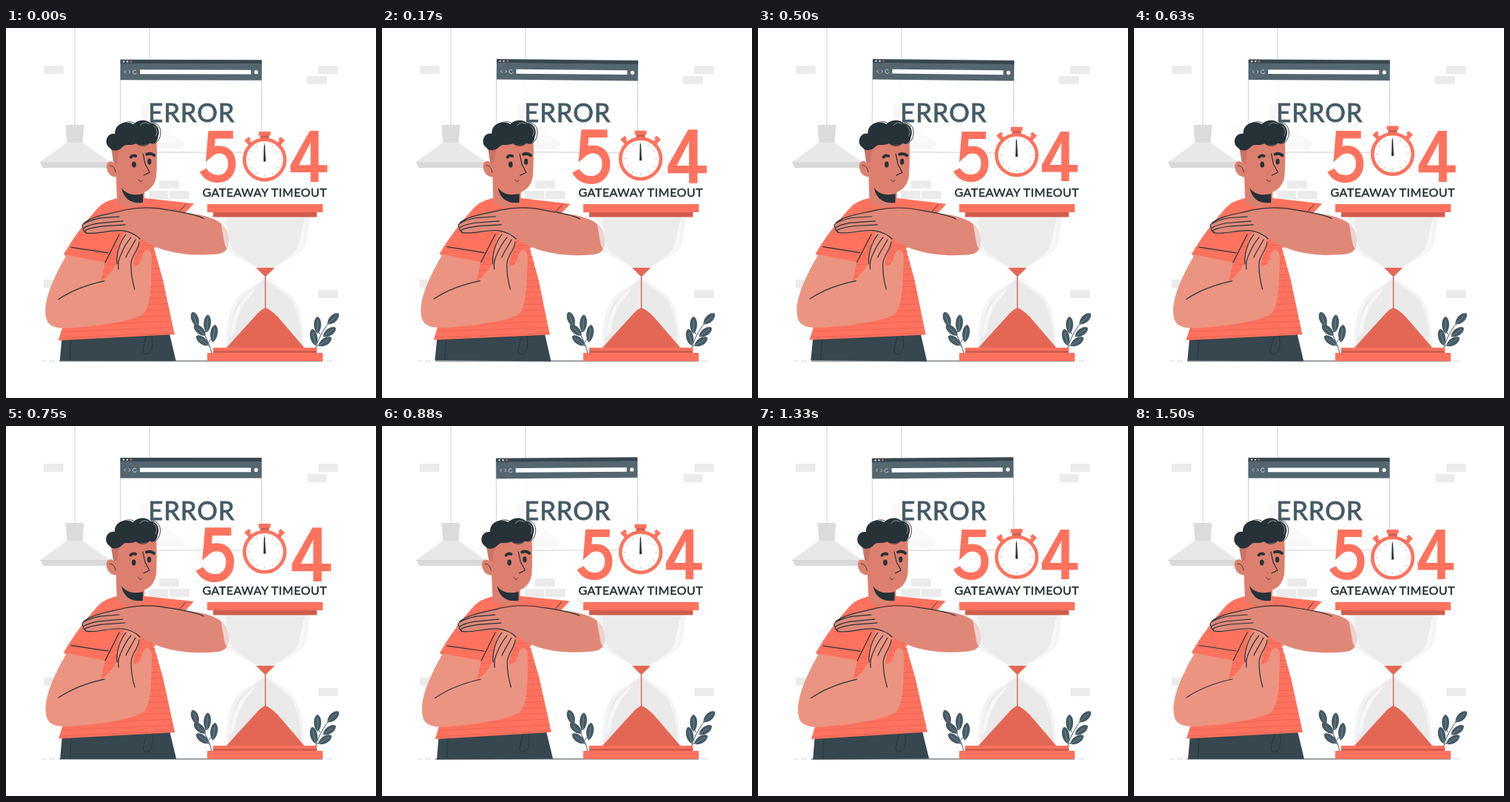
These frames come from a looping animation (500 px wide and 500 px high, 1540 ms). An HTML page:

```html
<!DOCTYPE html>
<html lang="en">
<head>
<meta charset="utf-8">
<title>Gateway timeout</title>
<style>
html, body { margin: 0; width: 100%; height: 100%; overflow: hidden; background: #fff; }
svg { display: block; width: 100%; height: 100%; }
text { font-family: Lato, "Open Sans", sans-serif; font-weight: 400; text-anchor: middle; }
.ink { fill: none; stroke: #263238; stroke-width: 1.2; stroke-linecap: round; stroke-linejoin: round; }
.fine { stroke-width: .9; }
.brow { stroke-width: 4; }
.dark { fill: #263238; }
.coral { fill: #ff725e; }
.deep { fill: #d05d4d; }
.face { fill: #dd7f6e; }
.white { fill: #fff; }
</style>
</head>
<body>
<svg viewBox="0 0 500 500">
  <defs>
    <clipPath id="torso"><path d="M118 292L200 292L212 340L228 414L71 422.500L84 380Z"/></clipPath>
    <g id="lamp">
      <path d="M0 -140V131" stroke="#cfcfcf"/>
      <path d="M-12.500 131H12.500L10.500 156H-10.500Z" fill="#dcdcdc"/>
      <path d="M-10.500 155H10.500L47 181H-47Z" fill="#e8e8e8"/>
      <path d="M-47 181H47L44 189H-43Z" fill="#d9d9d9"/>
    </g>
  </defs>

  <g id="bricks" fill="#ebebeb"></g>
  <use href="#lamp" x="93"/>
  <use href="#lamp" x="194" y="-26"/>

  <g id="browser">
    <rect x="154.500" y="43" width="191" height="125" fill="#fff" fill-opacity=".8" stroke="#c4c4c4" stroke-width=".8"/>
    <rect x="154.500" y="43" width="191" height="5.500" fill="#37474f"/>
    <rect x="154.500" y="48" width="191" height="22.500" fill="#546670"/>
    <circle cx="159" cy="45.600" r="1.100" class="white"/>
    <circle cx="164" cy="45.600" r="1.100" class="white"/>
    <circle cx="169" cy="45.600" r="1.100" class="coral"/>
    <path d="M162 57.500L160 59.500L162 61.500M166 57.500L168 59.500L166 61.500M176 58A2.600 2.600 0 1 0 176.500 60.500" fill="none" stroke="#fff" stroke-width=".7"/>
    <rect x="181" y="56.500" width="150" height="5.800" class="white"/>
    <circle cx="338" cy="59.500" r="2.600" class="white"/>
  </g>

  <text x="250.800" y="126.500" font-size="34.500" letter-spacing="1" fill="#455a64" stroke="#455a64" stroke-width=".9">ERROR</text>
  <path d="M48 450H54M58 450H66M433 450H441" stroke="#263238" stroke-width=".5" opacity=".4"/>
  <path d="M72 450H428" stroke="#263238" stroke-width=".9"/>

  <g id="man">
    <path d="M76 416L73 450H230L220 408Z" fill="#37474f"/>
    <path class="ink fine" d="M88 422L86.500 448M190 416C187 427 184 435 186 439C189 442 195 440 197 434C199 427 198 420 197 415"/>
    <path class="coral" d="M150 230C135 234 129 237 120 248C104 266 90 285 78 306L92 318L84 380L71 422.500L228 414L212 340L200 298L240 252L254 237L188 230Z"/>
    <g id="stripes" clip-path="url(#torso)" stroke="#e4624f" stroke-width=".8"></g>
    <path class="ink fine" d="M243 238L235 247"/>

    <g id="head">
      <path class="face" d="M148 185L150 236C160 246 180 244 187 236L187 210Z"/>
      <path class="dark" d="M156 216C164 227 176 226 185 224V236C169 238 159 231 156 216Z"/>
      <path class="face" d="M147 158L203 148C204 167 204 185 203 200C201 215 190 224 177 223C164 221 155 213 152 200C148 203 140 201 137 193C133 183 139 177 146 182Z"/>
      <path d="M142 163L156 157C152 166 151 175 150 183L145 181Z" fill="#c97466"/>
      <path class="ink fine" d="M140 186C145 186 147 190 148 195"/>
      <path class="dark" d="M140 162C131 156 136 141 147 143C146 130 161 124 172 130C179 122 192 124 195 129C204 128 209 139 205 147C205 154 199 158 194 155C190 159 181 160 176 156C168 160 162 156 158 160C152 167 143 167 140 162Z"/>
      <path class="ink fine" d="M149 141C151 127 168 124 174 129M195 128C208 127 211 140 207 149C204 157 197 157 194 155M176 156C183 162 192 159 194 155"/>
      <path d="M181 132C184 127 190 127 193 130M199 132C204 135 205 141 202 146" fill="none" stroke="#fff" stroke-width=".5"/>
      <path class="ink brow" d="M168.500 174.500C170 172.500 173 172 175 173M190 170.500C194 169 197 169.500 200 172"/>
      <ellipse class="dark" cx="172.800" cy="184.500" rx="2.800" ry="4.100"/>
      <ellipse class="dark" cx="193.600" cy="180.500" rx="2.600" ry="4.100"/>
      <path class="ink" d="M185 170L188 184L194 195L186 199"/>
      <path class="ink fine" d="M179 205C180 208 183 208 184 206"/>
    </g>

    <path d="M83 305C65 336 48 372 55 394C59 408 80 407 100 404.500C135 402 165 396 182 389C197 383 196 345 197 310C197 297 186 297 184 309C183 316 178 322 172 322C172 308 179 300 181 289L178 278L160 276C153 288 150 300 150 316C146 326 139 335 128 343L134 316Z" fill="#eb9481"/>
    <path class="coral" d="M120 248L78 306L134 317L153 278L148 246Z"/>
    <path class="ink" d="M88 296.500L138 304M134 317L153 279"/>
    <path class="ink" d="M133 342C110 347 87 356 71 367M150 319C149 304 154 289 162 279M152 326C151 318 152 313 155 307C159 297 164 289 169 283M162 310C166 301 171 294 175 286M180 289C179 301 170 306 169 319C169 333 171 343 174 353"/>

    <path d="M301 284C303 298 296 305 282 305.500C242 309 204 302 180 283C172 275 160 275 149 275C132 276 118 280 106 277C101 274 102 267 110 261C128 251 145 250 160 246C190 241 225 247 260 252C286 257 300 266 301 284Z" fill="#e08877"/>
    <path class="ink" d="M105 264C118 253 143 251 160 246C185 241 202 242 220 246C240 249 257 252 267 257M104 270C99 265 113 260 127 257L153 255M108 276C98 271 110 267 124 264L158 261M108 277C101 273 117 270 130 268L161 266M108 277C122 280 142 272 158 274C170 276 176 280 181 285"/>
  </g>

  <g id="digits">
    <path d="M308 145H280L278 169C282 165.500 286 164.500 290 164.500C301 164.500 306.500 173 306.500 183C306.500 195 299 203 288 203C279 203 272.500 199 268.500 191.500" fill="none" stroke="#ff725e" stroke-width="10"/>
    <path class="coral" fill-rule="evenodd" d="M409 140H420.500V185H432V194.500H420.500V207H410V194.500H383.500V185ZM410 155L394.500 185H410Z"/>
  </g>

  <g id="watch">
    <g class="coral">
      <path d="M322 152L328 147L331 150L329.500 152L333 156L329 160L325.500 155.500Z"/>
      <path d="M377 152L371 147L368 150L369.500 152L366 156L370 160L373.500 155.500Z"/>
    </g>
    <rect class="deep" x="343.500" y="145" width="12" height="6"/>
    <rect class="coral" x="341.500" y="140" width="16" height="5.500"/>
    <circle cx="349.500" cy="178" r="27.300" fill="#fff" stroke="#ff725e" stroke-width="4.600"/>
    <g id="ticks" stroke="#d5aaa3" stroke-width=".8"></g>
    <path class="dark" d="M348 180L348.600 159L349.300 157L350 159L351 180Z"/>
    <circle class="dark" cx="349.500" cy="179" r="1.700"/>
  </g>

  <text x="349.700" y="228" font-size="16" letter-spacing=".5" fill="#263238" stroke="#263238" stroke-width=".5">GATEAWAY TIMEOUT</text>

  <g id="plants" fill="#455a64" stroke="#455a64"></g>

  <g id="hourglass">
    <path d="M289 255H411L405 290C403 300 397 304 388 309L353 330V339L382 359C394 369 402 386 403 433H297C298 386 306 369 318 359L348 339V330L312 309C303 304 297 300 295 290Z" fill="#f0f0f0" fill-opacity=".72"/>
    <path d="M297 255H404L398 288C396 299 391 303 383 308L352 330V336H349V330L317 308C309 303 304 299 302 288Z" fill="#eaeaea" fill-opacity=".85"/>
    <path d="M350 339L321 362C309 372 302 396 301 433H400C399 396 391 372 379 362Z" fill="#e9e9e9" fill-opacity=".85"/>
    <path d="M337 351C323 361 317 370 311 382C306 393 304 405 303 419L309 410C311 394 315 383 322 373C328 363 334 358 337 351ZM402 263L396 290C394 298 391 302 386 306L393 303C399 299 401 295 402 289L405 263Z" fill="#fafafa" fill-opacity=".85"/>
    <path d="M338 324H363L352 335H349Z" fill="#e46755"/>
    <path d="M350.500 334V380" stroke="#e46755" stroke-width="1.500"/>
    <path d="M297 433L337 389C342 383 346 380 350.500 378C356 380 362 385 367 390L404 433Z" fill="#e46755"/>
    <rect class="coral" x="272" y="238" width="156" height="11"/>
    <rect class="deep" x="280" y="249" width="140" height="6.500"/>
    <rect class="coral" x="280" y="432" width="140" height="5"/>
    <rect class="deep" x="280" y="436" width="140" height="3"/>
    <rect class="coral" x="272" y="439" width="156" height="11"/>
  </g>
</svg>
<script>
const $ = id => document.getElementById(id);
const fill = (id, html) => { $(id).innerHTML = html; };

fill('bricks', [[51, 51], [422, 51], [407, 65], [207, 206], [221, 220], [193, 220], [51, 340], [422, 354]]
  .map(([x, y]) => `<rect x="${x}" y="${y}" width="26.500" height="11"/>`).join(''));

fill('stripes', Array.from({ length: 16 }, (_, i) => {
  const y = 294 + i * 8;
  return `<path d="M70 ${y + 5}L230 ${y - 2}"/>`;
}).join(''));

fill('ticks', Array.from({ length: 12 }, (_, i) =>
  `<path d="M349.500 155.500v3" transform="rotate(${i * 30} 349.500 178)"/>`).join(''));

// Leaves: centre x, centre y, half length, tilt
const leaf = ([x, y, r, a]) => `<g transform="translate(${x} ${y}) rotate(${a})">
  <path stroke="none" d="M0 ${r}C-7 ${r * .5} -6 ${-r * .8} 0 ${-r}C6 ${-r * .8} 7 ${r * .5} 0 ${r}Z"/>
  <path fill="none" stroke="#a3b0b5" stroke-width=".5" d="M0 ${r}V${-r * .6}"/></g>`;
const stem = d => `<path fill="none" d="${d}"/>`;
fill('plants',
  stem('M278 440C275 422 263 407 257 397M274 424L281 416M269 411L272 402M275 430L268 425') +
  stem('M417 440C420 421 430 405 440 394M420 424L416 417M424 414L421 406M420 430L428 425') +
  [[255.5, 393.5, 10.500, -20], [272, 399.5, 12, 4], [262, 408.5, 10.500, -48], [281, 413, 12, 8], [265.5, 422.5, 10.500, -52],
   [442, 393, 10.500, 46], [421, 401.5, 11.500, 0], [437, 411, 10.500, 55], [416, 418, 11.500, -12], [431, 424, 10.500, 58]]
    .map(leaf).join(''));

const LOOP = 1540, STEP = 1000 / 24, STEPS = 37;

// Piecewise linear value from [position, value] stops
function track(stops, u) {
  const i = Math.max(1, stops.findIndex(s => s[0] >= u));
  const [a, x] = stops[i - 1], [b, y] = stops[i];
  return x + (y - x) * (u - a) / (b - a);
}
const SWAY = [[0, 0], [.25, 1], [.75, -1], [1, 0]];
const BEAT = [[0, 1], [.1, 1.1], [.3, 1], [.4, 1], [.5, 1.1], [.6, 1], [1, 1]];

function draw(now) {
  const t = now % LOOP;
  const n = Math.min(STEPS - 1, Math.floor((t + 5.01) / STEP));
  const u = (n + 1) / STEPS;
  const angle = track(SWAY, u);
  const lift = 8 * Math.sin(Math.PI * u) ** 2;
  $('man').setAttribute('transform', `rotate(${angle} 177 289)`);
  $('browser').setAttribute('transform', `rotate(${angle} 250 105)`);
  $('watch').setAttribute('transform', `translate(0 ${-lift})`);
  $('digits').setAttribute('transform', `translate(349.500 173) scale(${track(BEAT, u)}) translate(-349.500 -173)`);
}

let start;
function tick(now) {
  start ??= now;
  draw(now - start);
  requestAnimationFrame(tick);
}
draw(0);
requestAnimationFrame(tick);
</script>
</body>
</html>
```
